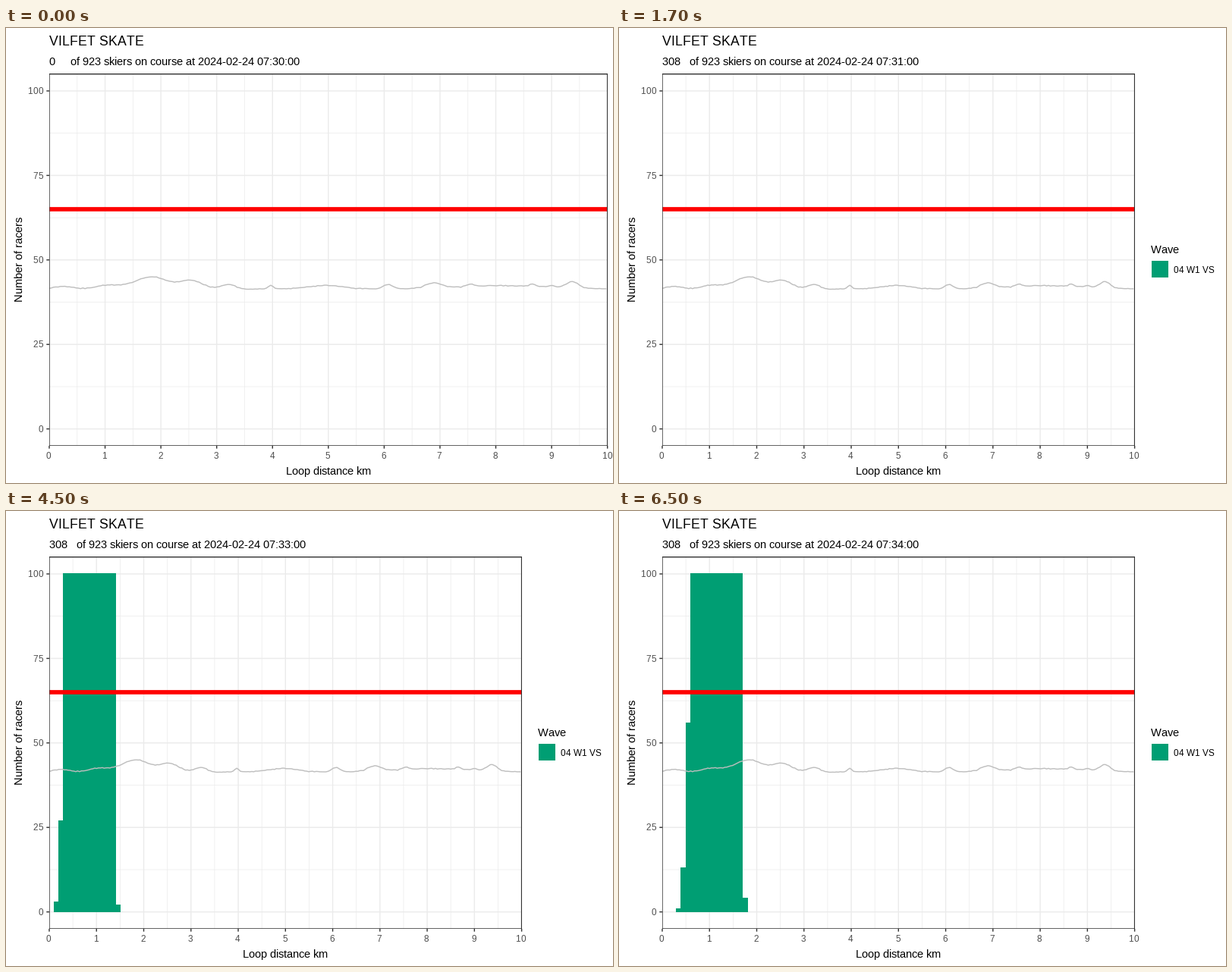
A matplotlib script for the animation above (8 s loop, 800 by 600 pixels).

```python
import math

import matplotlib.pyplot as plt
import numpy as np
from matplotlib.animation import FuncAnimation
from matplotlib.patches import PathPatch, Rectangle
from matplotlib.textpath import TextPath
from matplotlib.transforms import Affine2D

plt.rcParams["font.family"] = "Liberation Sans"
plt.rcParams["path.snap"] = False

W, H, DPI = 800, 600, 100
PT = 72 / DPI                        # points per pixel
LEFT, TOP, BOTTOM = 57, 60.7, 550.95
WIDE_RIGHT, NARROW_RIGHT = 792.67, 679.6
SMALL, NORMAL, LARGE = 11.73, 14.67, 17.6
THIN, LINE, THICK = 0.71, 1.42, 5.69
GREEN, GRID, DARK, LABEL = "#009E73", "#EBEBEB", "#333333", "#4D4D4D"

TITLE = "VILFET SKATE"
WAVE = "04 W1 VS"
SKIERS, CAP, BIN = 923, 100, 0.1

# Course profile: hills as (km, height, width) above a flat base
BASE = 41.4
HILLS = [
    (0.25, 0.8, 0.22), (1.05, 1.1, 0.3), (1.83, 3.6, 0.42),
    (2.55, 2.4, 0.28), (3.2, 1.4, 0.17), (3.97, 1.1, 0.06),
    (4.95, 1.0, 0.45), (6.07, 1.3, 0.12), (6.88, 1.5, 0.2),
    (7.55, 0.7, 0.09), (8.1, 1.0, 1.1), (8.66, 0.7, 0.07),
    (9.0, 0.6, 0.07), (9.37, 1.9, 0.16),
]
course_km = np.linspace(0, 9.98, 250)
profile = BASE + sum(h * np.exp(-((course_km - km) / w) ** 2)
                     for km, h, w in HILLS)
profile += np.random.default_rng(4).normal(0, 0.06, course_km.size)

fig = plt.figure(figsize=(W / DPI, H / DPI), dpi=DPI, facecolor="white")
ax = fig.add_axes([0, 0, 1, 1])
advances = {}


def advance(char, size):
    """Advance of one glyph, rounded to whole pixels."""
    if (char, size) not in advances:
        def width(s):
            return TextPath((0, 0), s, size=100).get_extents().width
        unit = (width(f"H{char}H") - width("HH")) / 100
        advances[char, size] = round(unit * size)
    return advances[char, size]


def pens(text, size, start, align):
    """Yield visible glyphs with their pen positions."""
    pen = round(start - align * sum(advance(c, size) for c in text))
    for char in text:
        if char != " ":
            yield char, pen
        pen += advance(char, size)


def write(x, y, text, size, color="black", align=0.0):
    """Set text on the pixel grid; align is the share of width before x."""
    for char, pen in pens(text, size, x, align):
        # the renderer rounds up side bearings, half a pixel undoes that
        ax.text(pen - 0.49, y, char, fontsize=size * PT, color=color,
                ha="left", va="baseline")


def write_upward(x, y, text, size):
    for char, pen in pens(text, size, -y, 0.5):
        turn = Affine2D.from_values(0, -1, -1, 0, x, -pen)
        glyph = TextPath((0, 0), char, size=size).transformed(turn)
        ax.add_patch(PathPatch(glyph, fc="black", lw=0))


def stroke(xs, ys, color, width, clip=None, zorder=2):
    line, = ax.plot(xs, ys, color=color, lw=width * PT, zorder=zorder,
                    solid_capstyle="butt", solid_joinstyle="round")
    if clip:
        line.set_clip_path(clip)


def fill(x0, y0, x1, y1):
    ax.add_patch(Rectangle((x0, y0), x1 - x0, y1 - y0, fc=GREEN, lw=0,
                           antialiased=False))


def y_at(value):
    return BOTTOM - (value + 5) / 110 * (BOTTOM - TOP)


def racers(minute):
    """Bins and counts: a full block moving on, a growing tail and a lead."""
    n = minute - 2
    if n < 0:
        return
    first = 3 * n
    for i in range(first, first + 11):
        yield i, CAP
    if n:
        yield first + 11, 2 * n
        for k in range(3):
            tail = (29 * n - 2) * math.exp(-2.2 / n ** 0.6 * k ** 1.5)
            if round(tail):
                yield first - 1 - k, round(tail)


def draw_legend():
    write(701, 297, "Wave", NORMAL)
    fill(702, 307, 724, 329)
    write(731, 323, WAVE, SMALL)


def draw_minute(minute):
    right = NARROW_RIGHT if minute else WIDE_RIGHT

    def x_at(km):
        return LEFT + km / 10 * (right - LEFT)

    top, bottom = math.floor(TOP), math.ceil(BOTTOM)
    panel = Rectangle((LEFT, top), math.ceil(right) - LEFT, bottom - top,
                      transform=ax.transData)

    for start, width in ((0.5, THIN), (0, LINE)):
        for y in map(y_at, np.arange(25 * start, 101, 25)):
            stroke([LEFT, right], [y, y], GRID, width, panel, zorder=0)
        for x in map(x_at, np.arange(start, 10.1)):
            stroke([x, x], [TOP, BOTTOM], GRID, width, panel, zorder=0)

    for i, count in racers(minute):
        fill(x_at(i * BIN), y_at(count), x_at((i + 1) * BIN), y_at(0))

    stroke(x_at(course_km), y_at(profile), "#BEBEBE", LINE, panel)
    stroke([LEFT, right], [y_at(65)] * 2, "#FF0000", THICK, panel)
    border = ax.add_patch(Rectangle((LEFT, TOP), right - LEFT, BOTTOM - TOP,
                                    fill=False, ec=DARK, lw=LINE * PT,
                                    zorder=3))
    border.set_clip_path(panel)

    for value in range(0, 101, 25):
        y = y_at(value)
        stroke([LEFT - 3.67, LEFT], [y, y], DARK, LINE)
        write(50, round(y + 4.2), str(value), SMALL, LABEL, align=1)
    for km in range(11):
        x = x_at(km)
        stroke([x, x], [BOTTOM, BOTTOM + 3.67], DARK, LINE)
        write(x - 0.1, 568, str(km), SMALL, LABEL, align=0.5)

    on_course = 308 if minute else 0
    write(57, 23, TITLE, LARGE)
    write(57, 49, f"{on_course:<3}   of {SKIERS} skiers on course at "
          f"2024-02-24 07:{30 + minute}:00", NORMAL)
    write((LEFT + right) / 2, 589, "Loop distance km", NORMAL, align=0.5)
    write_upward(21, (TOP + BOTTOM) / 2, "Number of racers", NORMAL)
    if minute:
        draw_legend()


def update(frame):
    ax.clear()
    ax.set(xlim=(0, W), ylim=(H, 0))
    ax.axis("off")
    draw_minute((frame + 3) // 4)    # one simulated minute per two seconds
    return []


anim = FuncAnimation(fig, update, frames=16, interval=500, repeat=True,
                     repeat_delay=0, blit=False)
plt.show()
```
